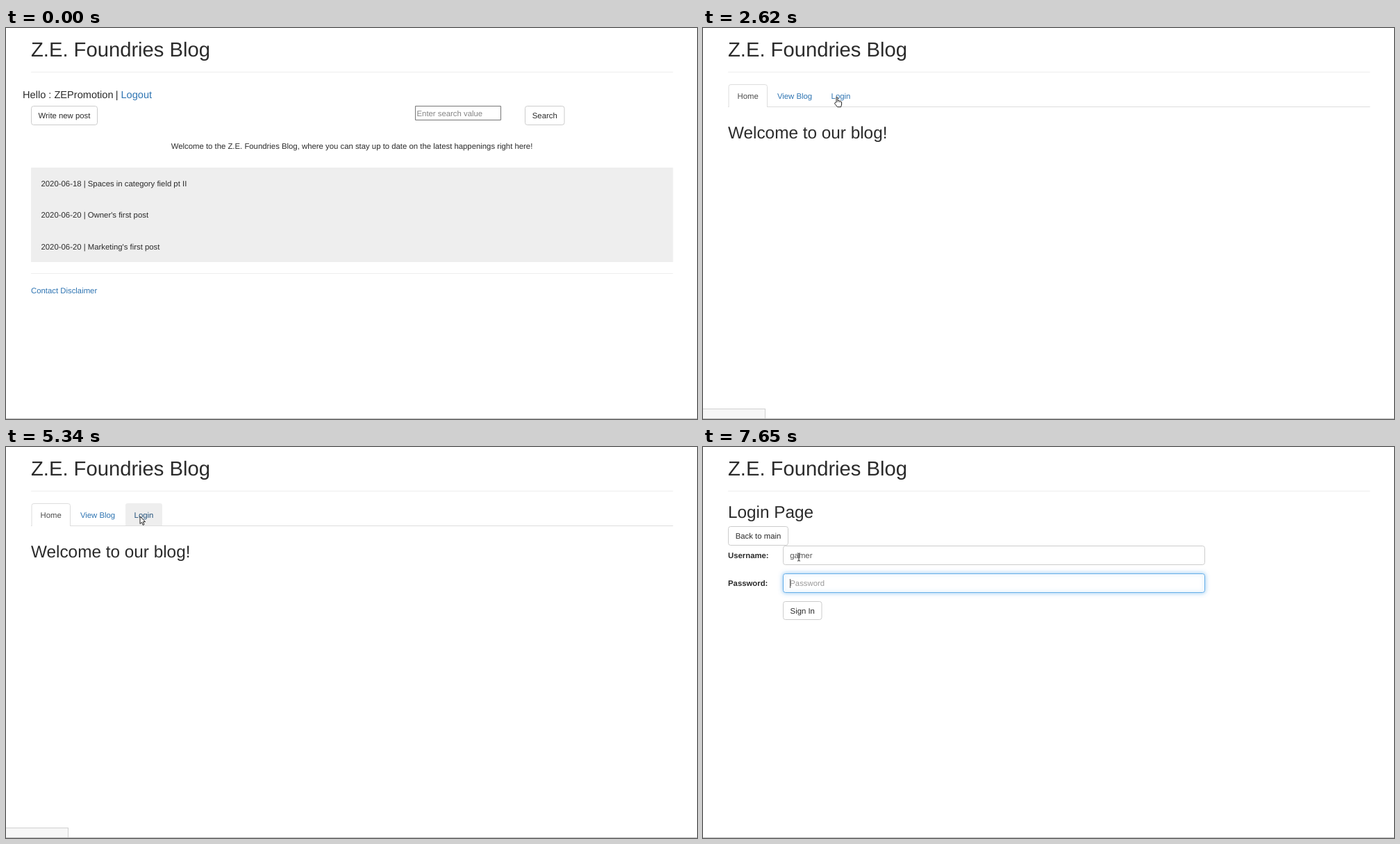
These frames come from a looping animation (995 px wide and 563 px high, 8 s). An HTML page with a canvas:

```html
<!DOCTYPE html>
<html lang="en">
<head>
<meta charset="utf-8">
<title>Blog login</title>
<style>
  html, body { margin: 0; width: 100%; height: 100%; overflow: hidden; background: #fff; }
  canvas { display: block; }
</style>
</head>
<body>
<canvas id="stage" width="995" height="563"></canvas>
<script>
const ctx = document.getElementById('stage').getContext('2d');
const LOOP = 8000;
const SANS = '"Liberation Sans", Arial, sans-serif';
const UI = '"Noto Sans", "Open Sans", sans-serif';
const BODY = 11.35, H4 = 14.6, H2 = 24.33, H1 = 29.2;
const INK = '#2b2b2b', LINK = '#2e74b2', LINK_HOVER = '#23527c', FAINT = '#eee';
const LEFT = 36, RIGHT = 960.5;

const HOME_AT = 2620, LOGIN_AT = 5420;
const FOCUS_USER = 5800, FOCUS_PASS = 7500, FADE = 150;

const USER = 'gamer';
const KEY_TIMES = [6340, 6490, 7040, 7270, 7350];

// Pointer tip: time, x, y
const TRACK = [
  [70, 838, 539], [140, 640, 470], [210, 427, 395], [440, 424, 393],
  [600, 335, 332], [760, 240, 266], [880, 192, 226], [980, 172, 187],
  [1100, 184, 150], [1230, 191.5, 112], [1320, 191.5, 111], [1490, 191.5, 110],
  [1570, 191.5, 109.5], [1700, 191.5, 109], [1740, 192.5, 103], [1830, 193, 99],
  [3030, 193, 99], [3200, 176, 101], [3400, 135, 107], [3580, 116, 110],
  [4440, 116, 110], [4460, 117.5, 109], [4870, 117.5, 109], [5030, 148, 106],
  [5260, 193, 100], [5420, 193, 100], [5570, 138, 153]
];

const ARROW = new Path2D('M0 0V10.6L2.5 8.3 4.2 12.4 6 11.6 4.3 7.7H7.6Z');
const HAND = new Path2D('M3 8V1.5a1 1 0 0 1 2 0V5.8l1.2-.4 1.1.7 1.3-.1 1 .8 1 .8V11l-1 3.7H4.6L1 10.4Q.1 8.8 1.5 8.2Z');
const BEAM = new Path2D('M-2 0H-.6L0 .7.6 0H2M0 .7V10.3M-2 11H-.6L0 10.3.6 11H2');

const clamp = v => Math.max(0, Math.min(1, v));

function pointer(t) {
  if (t < TRACK[0][0]) return null;
  for (let i = 1; i < TRACK.length; i++) {
    const [t0, x0, y0] = TRACK[i - 1], [t1, x1, y1] = TRACK[i];
    if (t < t1) {
      const k = (t - t0) / (t1 - t0);
      return { x: x0 + (x1 - x0) * k, y: y0 + (y1 - y0) * k };
    }
  }
  const [, x, y] = TRACK[TRACK.length - 1];
  return { x, y };
}

const inside = (p, x, y, w, h) => !!p && p.x >= x && p.x < x + w && p.y >= y && p.y < y + h;

function text(str, x, y, { size = BODY, color = INK, weight = '', family = SANS, align = 'left', line = false } = {}) {
  ctx.font = `${weight} ${size}px ${family}`;
  ctx.fillStyle = color;
  ctx.textAlign = align;
  ctx.fillText(str, x, y);
  const w = ctx.measureText(str).width;
  if (line) ctx.fillRect(x, Math.round(y) + 1, w, 1);
  return w;
}

function rect(x, y, w, h, color) {
  ctx.fillStyle = color;
  ctx.fillRect(x, y, w, h);
}

function box(x, y, w, h, stroke, r = 3.2) {
  ctx.beginPath();
  ctx.roundRect(x + 0.5, y + 0.5, w - 1, h - 1, r);
  ctx.fillStyle = '#fff';
  ctx.fill();
  ctx.strokeStyle = stroke;
  ctx.lineWidth = 1;
  ctx.stroke();
}

function button(label, x, y, w, h) {
  box(x, y, w, h, '#ccc');
  text(label, x + w / 2, y + 18, { align: 'center' });
}

function field(y, focus) {
  ctx.save();
  if (focus > 0) {
    ctx.shadowColor = `rgba(102,175,233,${0.7 * focus})`;
    ctx.shadowBlur = 6.5;
  }
  const mix = (a, b) => Math.round(a + (b - a) * focus);
  box(115, y, 608, 28, `rgb(${mix(204, 102)},${mix(204, 175)},${mix(204, 233)})`);
  ctx.restore();
}

function blogPage(t, p) {
  const out = t >= 1740;
  text('Hello : ZEPromotion', 24, 101, { size: H4 });
  text('|', 157.7, 101, { size: H4 });
  text('Logout', 165.5, 101, { size: H4, color: out ? LINK_HOVER : LINK, line: out });

  button('Write new post', 36, 112, 96, 28);
  box(589, 112, 124, 21, '#767676', 0);
  text('Enter search value', 591.5, 126.5, { color: '#858585' });
  button('Search', 747, 112, 57.5, 28);

  text('Welcome to the Z.E. Foundries Blog, where you can stay up to date on the latest happenings right here!',
    498, 174, { align: 'center' });

  rect(LEFT, 201, RIGHT - LEFT, 136, FAINT);
  ['2020-06-18 | Spaces in category field pt II',
   "2020-06-20 | Owner's first post",
   "2020-06-20 | Marketing's first post"].forEach((title, i) => {
    const y = 228 + i * 45.3;
    text(title, 50.5, y, { line: inside(p, 50, y - 11, 210, 15) });
  });

  rect(LEFT, 353, RIGHT - LEFT, 1, FAINT);
  text('Contact Disclaimer', LEFT, 382, { color: LINK });
}

function tabAt(t, p) {
  if (t < HOME_AT + 80) return '';
  if (inside(p, 94, 81, 77, 33)) return 'view';
  return inside(p, 171, 81, 54, 33) ? 'login' : '';
}

function tab(label, x, y0, w, hot) {
  if (hot) {
    ctx.beginPath();
    ctx.roundRect(x, 81, w, 33, [3.2, 3.2, 0, 0]);
    ctx.fillStyle = FAINT;
    ctx.fill();
  }
  text(label, x + w / 2, y0, { align: 'center', color: hot ? LINK_HOVER : LINK });
}

function homePage(t, p) {
  const hot = tabAt(t, p);
  tab('View Blog', 94, 102, 76, hot === 'view');
  tab('Login', 172, 102, 53, hot === 'login');
  rect(LEFT, 113, RIGHT - LEFT, 1, '#ddd');

  rect(37, 100, 55, 14, '#fff');
  ctx.beginPath();
  ctx.moveTo(37, 114);
  ctx.lineTo(37, 84.5);
  ctx.arcTo(37, 81.5, 40, 81.5, 3);
  ctx.lineTo(89.5, 81.5);
  ctx.arcTo(92.5, 81.5, 92.5, 84.5, 3);
  ctx.lineTo(92.5, 114);
  ctx.strokeStyle = '#ddd';
  ctx.lineWidth = 1;
  ctx.stroke();
  text('Home', 64.7, 102, { align: 'center', color: '#4c4c4c' });

  text('Welcome to our blog!', LEFT, 159, { size: H2 });
}

function loginPage(t) {
  const userFocus = clamp((t - FOCUS_USER) / FADE) * (1 - clamp((t - FOCUS_PASS) / FADE));
  const passFocus = clamp((t - FOCUS_PASS) / FADE);
  const typed = USER.slice(0, KEY_TIMES.filter(k => t >= k).length);

  text('Login Page', LEFT, 102, { size: H2 });
  button('Back to main', 36, 114, 87, 28);
  text('Username:', LEFT, 160, { weight: 'bold' });
  text('Password:', LEFT, 200, { weight: 'bold' });

  field(142, userFocus);
  field(182, passFocus);
  const w = text(typed || 'Username', 125.3, 160, { color: typed ? '#555' : '#999' });
  text('Password', 125.3, 200, { color: '#999' });
  if (t >= FOCUS_PASS) rect(125, 190, 1, 13, '#555');
  else if (t >= FOCUS_USER) rect(Math.round(125.3 + (typed ? w : 0)), 150, 1, 13, '#555');

  button('Sign In', 115, 222, 56.5, 27);
}

function linkHint(t, p) {
  if (t < 1740 || t >= LOGIN_AT) return null;
  if (t < HOME_AT) return t < 1830 ? [90, ''] : [134, 'ZPost/a_portal_session_logout'];
  if (t < HOME_AT + 80 || t >= 5300) return [90, ''];
  return tabAt(t, p) === 'view' ? [105, 'ZPost/presentStartPage'] : [90, 'ZPost/presentLogin'];
}

function statusBar(t, p) {
  const hint = linkHint(t, p);
  if (hint) {
    const [w, label] = hint;
    rect(0, 548, w, 14, '#d0d0d0');
    rect(0, 549, w - 1, 13, '#f7f7f7');
    ctx.save();
    ctx.beginPath();
    ctx.rect(0, 548, w, 14);
    ctx.clip();
    text(label, 0, 561.7, { size: 9.1, family: UI, color: '#555' });
    ctx.restore();
  }
  rect(0, 562, 995, 1, '#bdbdbd');
}

function drawPointer(t, p) {
  if (!p) return;
  const onRow = t < 1740 && inside(p, 50, 217, 210, 15);
  ctx.save();
  ctx.translate(p.x, p.y);
  ctx.strokeStyle = '#222';
  ctx.lineWidth = 1;
  if (t >= 5500) {
    ctx.stroke(BEAM);
  } else {
    const hand = onRow || (t >= 1740 && t < 5300);
    if (hand) ctx.translate(-4, 0);
    const shape = hand ? HAND : ARROW;
    ctx.fillStyle = '#fff';
    ctx.fill(shape);
    ctx.stroke(shape);
    if (hand) {
      ctx.lineWidth = 0.6;
      ctx.stroke(new Path2D('M5 5.8V8M7.2 6.1V8.2M9 6.4V8.4'));
    }
  }
  ctx.restore();
}

function draw(now) {
  const t = now % LOOP;
  const p = pointer(t);
  ctx.textRendering = 'geometricPrecision';
  rect(0, 0, 995, 563, '#fff');
  text('Z.E. Foundries Blog', LEFT, 41, { size: H1 });
  rect(LEFT, 63, RIGHT - LEFT, 1, FAINT);

  if (t < HOME_AT) blogPage(t, p);
  else if (t < LOGIN_AT) homePage(t, p);
  else loginPage(t);

  statusBar(t, p);
  drawPointer(t, p);
}

let start;
function tick(now) {
  start ??= now;
  draw(Math.max(0, now - start));
  requestAnimationFrame(tick);
}
draw(0);
requestAnimationFrame(tick);
</script>
</body>
</html>
```
